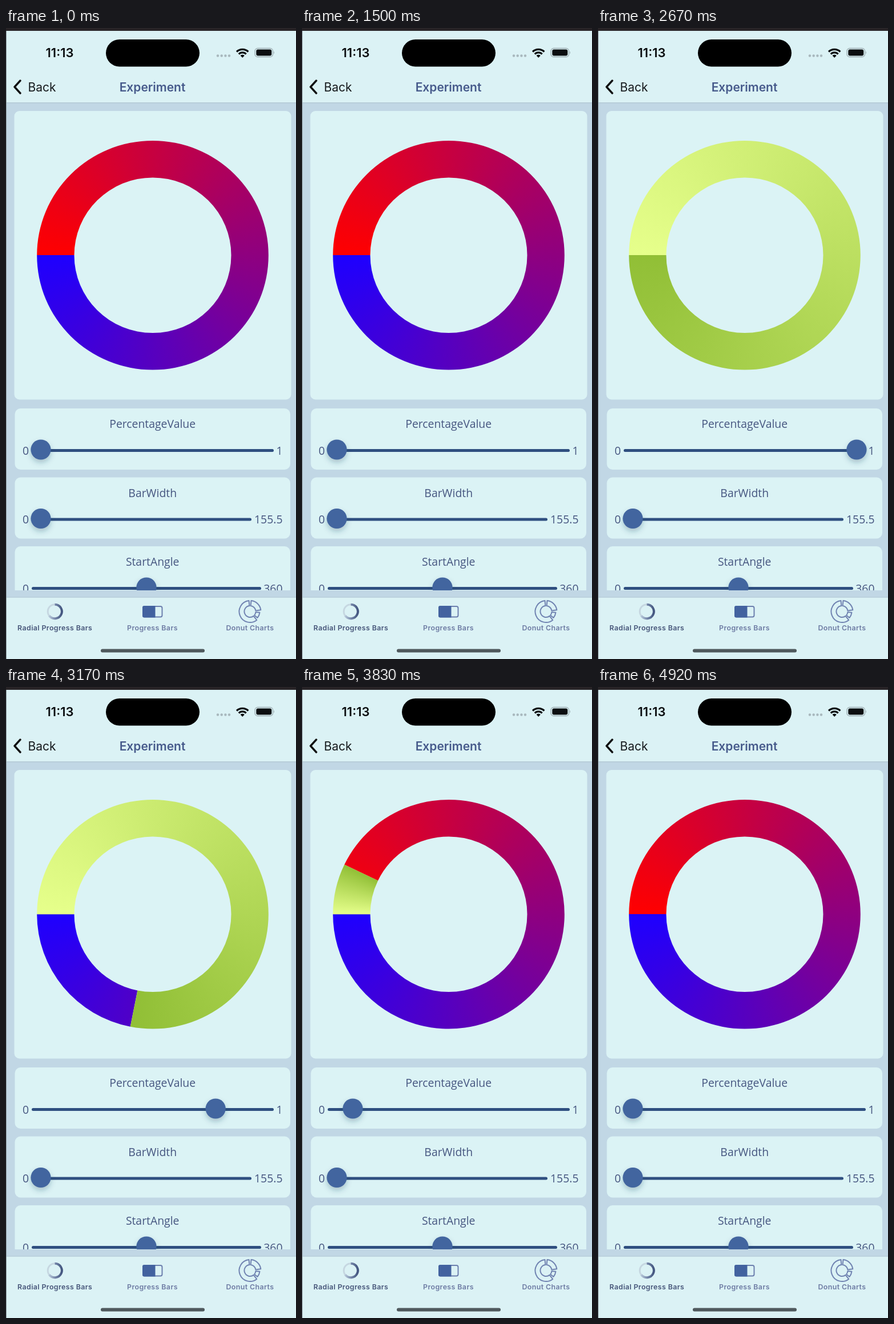
Write an HTML page with a canvas that moves like this. It is 508 px wide and 1103 px high and loops after 5 s.

```html
<!DOCTYPE html>
<html lang="en">
<head>
<meta charset="utf-8">
<title>Radial progress experiment</title>
<style>
  html, body { margin: 0; width: 100%; height: 100%; overflow: hidden; background: #dbf2f5; }
  svg, canvas { position: absolute; left: 0; top: 0; display: block; }
  canvas, .soft { filter: blur(.45px); }
  .ui { font-family: Inter, sans-serif; }
  .label { font: 19.4px "Open Sans", sans-serif; fill: #465680; }
  .tab { font: 600 12.4px Inter, sans-serif; letter-spacing: .4px; fill: #6d7ba3; text-anchor: middle; }
  .mid { text-anchor: middle; }
  .end { text-anchor: end; }
  .track { stroke: #2f4f80; stroke-width: 5; stroke-linecap: round; }
  .knob { fill: #42659f; filter: url(#shadow); }
</style>
</head>
<body>
<svg width="508" height="1103" viewBox="0 0 508 1103">
  <defs>
    <filter id="shadow" x="-60%" y="-60%" width="220%" height="240%">
      <feDropShadow dx="0" dy="5" stdDeviation="5" flood-color="#24405f" flood-opacity=".28"/>
    </filter>
    <linearGradient id="spin" x1="0" x2="1" y1="0" y2="0">
      <stop offset="0" stop-color="#b5c6d8"/>
      <stop offset=".5" stop-color="#7385a8"/>
      <stop offset="1" stop-color="#435680"/>
    </linearGradient>
    <clipPath id="view"><rect y="131" width="508" height="852"/></clipPath>
  </defs>

  <rect width="508" height="1103" fill="#dbf2f5"/>
  <rect y="130" width="508" height="866" fill="#c1d7e5"/>
  <rect y="130" width="508" height="1.5" fill="#b4c9d6"/>

  <g class="soft">
    <!-- status bar -->
    <text class="ui mid" x="94" y="51" font-size="22" font-weight="600" fill="#0b0e10">11:13</text>
    <rect x="175" y="20" width="164" height="47.5" rx="23.7"/>
    <g fill="#a8b8bd">
      <circle cx="371" cy="48.5" r="2.2"/><circle cx="377.7" cy="48.5" r="2.2"/>
      <circle cx="384.4" cy="48.5" r="2.2"/><circle cx="391" cy="48.5" r="2.2"/>
    </g>
    <g fill="none" stroke="#0b0e10" stroke-width="3.2">
      <path d="M404 41.5a14.5 14.5 0 0 1 20.4 0"/>
      <path d="M407.8 45.6a9 9 0 0 1 12.8 0"/>
    </g>
    <path d="M414.2 52l-3.6-3.8a5.2 5.2 0 0 1 7.2 0z" fill="#0b0e10"/>
    <rect x="436" y="35.5" width="31.5" height="15" rx="4.8" fill="none" stroke="#9dadb2" stroke-width="1.3"/>
    <rect x="438.3" y="37.6" width="27" height="10.8" rx="3" fill="#0b0e10"/>
    <path d="M469 40.5q2 2.5 0 5z" fill="#9dadb2"/>

    <!-- navigation bar -->
    <path d="M25 92L15 103l10 11" fill="none" stroke="#111" stroke-width="3.4" stroke-linecap="round" stroke-linejoin="round"/>
    <text class="ui" x="38.5" y="110.5" font-size="21" fill="#15191c">Back</text>
    <text class="ui mid" x="256.5" y="110.5" font-size="21" font-weight="600" fill="#465a8b">Experiment</text>

    <rect x="14.5" y="145" width="485" height="504.5" rx="9" fill="#dbf3f5"/>
  </g>
  <g class="soft"><g id="cards" clip-path="url(#view)"></g></g>

  <!-- tab bar -->
  <rect y="995" width="508" height="108" fill="#dbf2f5"/>
  <rect y="994.5" width="508" height="1.2" fill="#b4c9d6"/>
  <g class="soft">
    <circle cx="85.5" cy="1020" r="12.3" fill="none" stroke="#c6d7e1" stroke-width="3"/>
    <path d="M85.5 1007.7a12.3 12.3 0 1 1 -9.8 19.7" fill="none" stroke="url(#spin)" stroke-width="4"/>
    <rect x="240" y="1011" width="33.5" height="18.5" rx="3" fill="none" stroke="#6c7fae" stroke-width="2"/>
    <path d="M261.5 1010v20.5h-19.5a3 3 0 0 1-3-3v-14.5a3 3 0 0 1 3-3z" fill="#42629f"/>
    <g id="donut" fill="none" stroke="#7083b1" stroke-width="2" stroke-linejoin="round"></g>
    <text class="tab" x="85.7" y="1053" style="fill:#465579">Radial Progress Bars</text>
    <text class="tab" x="256.5" y="1053">Progress Bars</text>
    <text class="tab" x="427.5" y="1053">Donut Charts</text>
    <rect x="166" y="1085.5" width="182" height="6" rx="3" fill="#4f595d"/>
  </g>

  <rect width="508" height="5" fill="#282427"/>
  <rect y="5" width="1" height="1098" fill="#87949a"/>
</svg>
<canvas id="ring"></canvas>

<script>
const LOOP = 5000, STEP = LOOP / 60;
const KNOB_MIN = 61, KNOB_MAX = 453;
const RING = { x: 257, y: 397.3, rx: 202.8, ry: 200.3, hole: 0.678 };

// Slider cards: title, top, right end of track, maximum, knob position
const sliders = [
  ["PercentageValue", 665, 466.5, "1", KNOB_MIN],
  ["BarWidth", 785.5, 427.5, "155.5", KNOB_MIN],
  ["StartAngle", 906, 444.5, "360", 246]
];
document.getElementById("cards").innerHTML = sliders.map(([name, top, end, max, knob]) => `
  <g transform="translate(0 ${top})">
    <rect x="15.5" width="482.5" height="107" rx="10" fill="#dbf3f5"/>
    <text class="label mid" x="256.7" y="34">${name}</text>
    <text class="label" x="29" y="80.5">0</text>
    <text class="label end" x="484.5" y="80.5">${max}</text>
    <line class="track" x1="47.5" x2="${end}" y1="73.5" y2="73.5"/>
    <circle class="knob" cx="${knob}" cy="72" r="17.6"/>
  </g>`).join("");
const knob = document.querySelector(".knob");

// Outline of one donut slice, angles in degrees
function slice(from, to, inner, outer) {
  const at = (deg, r) => {
    const a = deg * Math.PI / 180;
    return `${427.5 + r * Math.cos(a)} ${1020 + r * Math.sin(a)}`;
  };
  const big = to - from > 180 ? 1 : 0;
  return `<path d="M${at(from, outer)}A${outer} ${outer} 0 ${big} 1 ${at(to, outer)}` +
    `L${at(to, inner)}A${inner} ${inner} 0 ${big} 0 ${at(from, inner)}z"/>`;
}
document.getElementById("donut").innerHTML =
  slice(52, 264, 10, 19) + slice(-84, -8, 10, 19) + slice(6, 40, 10, 17);

const canvas = document.getElementById("ring");
const ctx = canvas.getContext("2d");
const dpr = window.devicePixelRatio || 1;
canvas.width = 508 * dpr;
canvas.height = 650 * dpr;
canvas.style.width = "508px";
canvas.style.height = "650px";

// Ring piece between two shares of the turn, its gradient running from 0 to reach
function arc(from, to, reach, first, last) {
  const a = Math.PI * (1 + 2 * from), b = Math.PI * (1 + 2 * to);
  const paint = ctx.createConicGradient(Math.PI, 0, 0);
  paint.addColorStop(0, first);
  paint.addColorStop(reach, last);
  ctx.beginPath();
  ctx.arc(0, 0, 1, a, b);
  ctx.arc(0, 0, RING.hole, b, a, true);
  ctx.closePath();
  ctx.fillStyle = paint;
  ctx.fill();
}

const clamp = v => Math.min(1, Math.max(0, v));

// Drag right with growing speed, hold, drag back while slowing down
function valueAt(t) {
  if (t < 2900) return clamp((t - 1870) / 768) ** 2;
  return (1 - clamp((t - 3041) / 1081)) ** 2;
}

function draw(value) {
  ctx.setTransform(1, 0, 0, 1, 0, 0);
  ctx.clearRect(0, 0, canvas.width, canvas.height);
  ctx.setTransform(dpr * RING.rx, 0, 0, dpr * RING.ry, dpr * RING.x, dpr * RING.y);
  if (value < 1) arc(value, 1, 1, "#ff0000", "#1e00ff");
  if (value > 0) arc(0, value, value, "#e6ff8b", "#91bf36");
  knob.setAttribute("cx", KNOB_MIN + (KNOB_MAX - KNOB_MIN) * value);
}

const start = performance.now();
function tick(now) {
  const t = Math.max(0, now - start) % LOOP;
  draw(valueAt(Math.floor((t + 4) / STEP) * STEP));
  requestAnimationFrame(tick);
}
draw(0);
requestAnimationFrame(tick);
</script>
</body>
</html>
```
